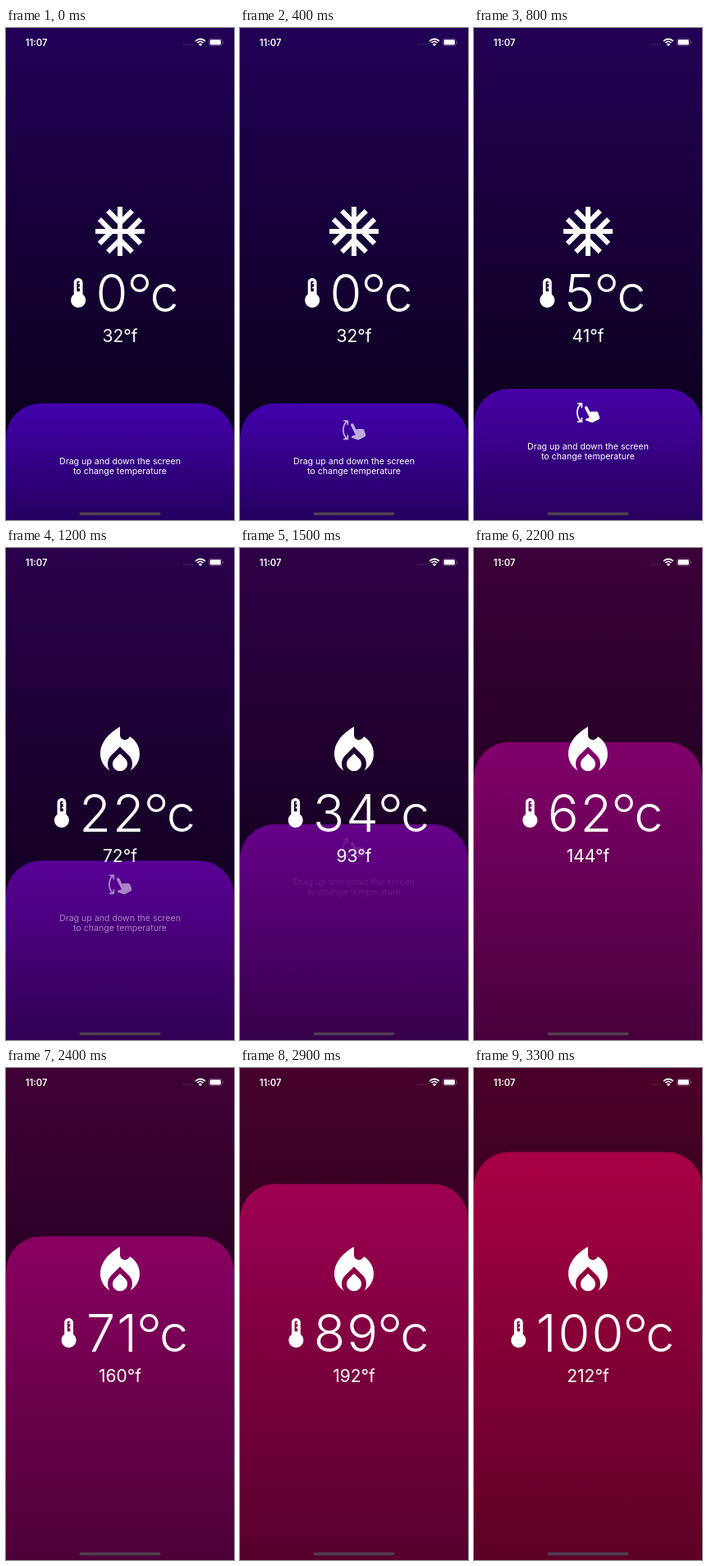
Recreate the animation shown at these times as an HTML page with a canvas. Size 278 by 600 pixels, loop 3400 ms.

```html
<!DOCTYPE html>
<html lang="en">
<head>
<meta charset="utf-8">
<title>Temperature slider</title>
<style>
html, body { margin: 0; width: 100%; height: 100%; overflow: hidden; background: #000; }
canvas { display: block; width: 278px; height: 600px; }
</style>
</head>
<body>
<canvas id="stage" width="278" height="600"></canvas>
<script>
const ctx = document.getElementById('stage').getContext('2d');
const LOOP = 3400, STEP = 100, W = 278, H = 600, MID = 139;

// Drag keyframes: [time in ms, degrees celsius]
const KEYS = [[0, 0], [600, 0], [700, 2], [800, 5], [1500, 34], [1900, 49],
  [2400, 71], [2900, 89], [3300, 100], [LOOP, 100]];

const COLD = [66, 0, 172], HOT = [168, 0, 68], HOT_SKY = [150, 0, 78];

const SNOW = new Path2D('M22 11h-4.17l3.24-3.24-1.41-1.42L15 11h-2V9l4.66-4.66-1.42-1.41L13 6.17V2h-2v4.17L7.76 2.93 6.34 4.34 11 9v2H9L4.34 6.34 2.93 7.76 6.17 11H2v2h4.17l-3.24 3.24 1.41 1.42L9 13h2v2l-4.66 4.66 1.42 1.41L11 17.83V22h2v-4.17l3.24 3.24 1.42-1.41L13 15v-2h2l4.66 4.66 1.41-1.42L17.83 13H22z');
const FIRE = new Path2D('M12 12.9l-2.13 2.09C9.31 15.55 9 16.28 9 17.06 9 18.68 10.35 20 12 20s3-1.32 3-2.94c0-.78-.31-1.52-.87-2.07L12 12.9zM16 6l-.44.55C14.38 8.02 12 7.19 12 5.3V2S4 6 4 13c0 2.92 1.56 5.47 3.89 6.86C7.33 19.07 7 18.1 7 17.06c0-1.32.52-2.56 1.47-3.5L12 10.1l3.53 3.47c.95.93 1.47 2.17 1.47 3.5 0 1.02-.31 1.96-.85 2.75 1.89-1.15 3.29-3.06 3.71-5.3C20.52 10.97 18.79 7.62 16 6z');
const THERMOMETER = new Path2D('M15 13V5c0-1.66-1.34-3-3-3S9 3.34 9 5v8c-1.21.91-2 2.37-2 4 0 2.76 2.24 5 5 5s5-2.24 5-5c0-1.63-.79-3.09-2-4zm-4-8c0-.55.45-1 1-1s1 .45 1 1h-1v1h1v2h-1v1h1v2h-2V5z');
const SWIPE = new Path2D('M1 3.5h2.02C1.13 5.82 0 8.78 0 12s1.13 6.18 3.02 8.5H1V22h5v-5H4.5v2.91C2.64 17.81 1.5 15.04 1.5 12S2.64 6.19 4.5 4.09V7H6V2H1zM13.85 11.62l-2.68-5.37c-.37-.74-1.27-1.04-2.01-.67C8.41 5.96 8.11 6.86 8.48 7.6l4.81 9.6-3.24.8c-.33.09-.59.33-.7.66L9 19.78l6.19 2.25c.5.17 1.28.02 1.75-.22l5.51-2.75c.89-.45 1.32-1.48 1-2.42l-1.43-4.27c-.27-.82-1.04-1.37-1.9-1.37h-4.56c-.31 0-.62.07-.89.21z');

const clamp = v => Math.min(1, Math.max(0, v));
const mix = (a, b, k) => a + (b - a) * k;

function celsiusAt(t) {
  const i = KEYS.findIndex(k => k[0] > t);
  const [t0, a] = KEYS[i - 1], [t1, b] = KEYS[i];
  return mix(a, b, (t - t0) / (t1 - t0));
}

// Vertical gradient of the current heat colour between two brightness levels
function shade(heat, hot, y0, y1, from, to) {
  const g = ctx.createLinearGradient(0, y0, 0, y1);
  const tone = dim => `rgb(${COLD.map((v, i) => mix(v, hot[i], heat) * dim)})`;
  g.addColorStop(0, tone(from));
  g.addColorStop(1, tone(to));
  return g;
}

function rounded(x, y, w, h, r, fill) {
  ctx.beginPath();
  ctx.roundRect(x, y, w, h, r);
  ctx.fillStyle = fill;
  ctx.fill();
}

function icon(path, x, y, scale) {
  ctx.save();
  ctx.translate(x, y);
  ctx.scale(scale, scale);
  ctx.fill(path);
  ctx.restore();
}

function text(str, x, y, weight, size, align = 'center', spacing = 0) {
  ctx.font = `${weight} ${size}px Inter, sans-serif`;
  ctx.letterSpacing = spacing + 'px';
  ctx.textAlign = align;
  ctx.fillText(str, x, y);
}

function statusBar() {
  ctx.fillStyle = '#fff';
  text('11:07', 23.7, 21.6, 600, 11.2, 'left');
  // Wi-Fi
  ctx.lineWidth = 1.8;
  for (const r of [8, 4.8]) {
    ctx.beginPath();
    ctx.arc(237, 21.5, r, -Math.PI * 0.76, -Math.PI * 0.24);
    ctx.stroke();
  }
  ctx.beginPath();
  ctx.moveTo(237, 22);
  ctx.arc(237, 22, 3, -Math.PI * 0.76, -Math.PI * 0.24);
  ctx.fill();
  // Battery
  rounded(248.7, 14.2, 13.2, 6.4, 1.3, '#fff');
  ctx.globalAlpha = 0.28;
  ctx.lineWidth = 0.8;
  ctx.beginPath();
  ctx.roundRect(247.3, 13, 16, 8.8, 2.4);
  ctx.stroke();
  rounded(264.2, 16, 1, 3, 0.5, '#fff');
  // Signal dots
  ctx.globalAlpha = 0.2;
  for (let i = 0; i < 4; i++) rounded(216.3 + i * 3.2, 19.2, 1.7, 1.7, 0.85, '#fff');
  ctx.globalAlpha = 1;
}

function hint(top, c, t) {
  const shown = clamp((37 - c) / 30);
  ctx.fillStyle = '#fff';
  ctx.globalAlpha = shown;
  text('Drag up and down the screen', MID, top + 74, 400, 10.6);
  text('to change temperature', MID, top + 86, 400, 10.6);
  const appear = clamp(t / 600);
  ctx.globalAlpha = shown * appear;
  icon(SWIPE, 125, top + 14.6 + 10 * (1 - appear), 1.2);
  ctx.globalAlpha = 1;
}

function reading(c) {
  const str = String(c), base = 345.5, tail = 61, iconBox = 43;
  ctx.font = '350 63px Inter, sans-serif';
  ctx.letterSpacing = '2px';
  const digits = ctx.measureText(str).width;
  const left = MID - (iconBox + digits + tail) / 2;
  const end = left + iconBox + digits;
  icon(THERMOMETER, left, 301.4, 1.8);
  text(str, left + iconBox, base, 350, 63, 'left', 2);
  ctx.lineWidth = 3.3;
  ctx.beginPath();
  ctx.arc(end + 12.5, 311, 9.4, 0, 2 * Math.PI);
  ctx.stroke();
  text('c', end + 25, base, 350, 63, 'left');
  text(Math.round(c * 1.8 + 32) + '°f', MID, 382.5, 400, 21);
}

function draw(t) {
  const value = celsiusAt(t), c = Math.round(value), heat = value / 100;
  const top = 457.8 - 3.554 * value;
  ctx.fillStyle = shade(heat, HOT_SKY, 0, H, 0.5, 0.1);
  ctx.fillRect(0, 0, W, H);
  rounded(0, top, W, H - top + 50, 42.7, shade(heat, HOT, top, H, 1, 0.55));
  hint(top, value, t);
  ctx.fillStyle = ctx.strokeStyle = '#fff';
  icon(c < 20 ? SNOW : FIRE, 103, 212, 3);
  reading(c);
  statusBar();
  rounded(89.5, 590.8, 99, 3.4, 1.7, '#50404f');
}

const start = performance.now();
function frame() {
  const t = (performance.now() - start) % LOOP;
  draw(Math.floor(t / STEP) * STEP);
  requestAnimationFrame(frame);
}
frame();
</script>
</body>
</html>
```
